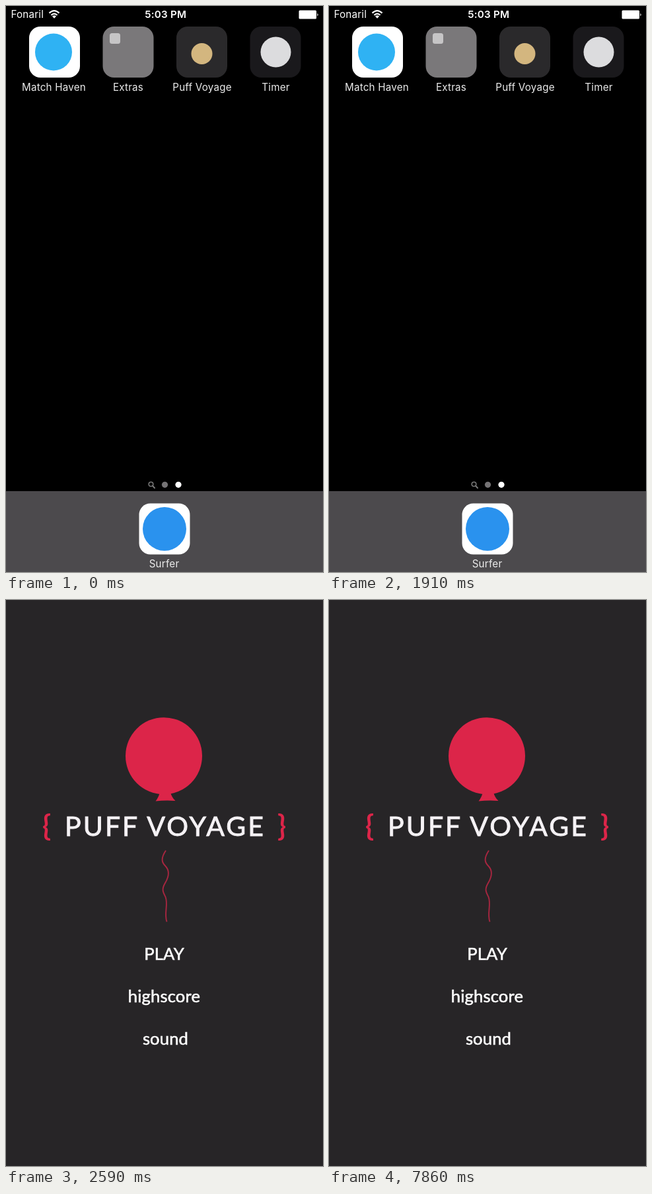
Animation of 480x854 px, one loop 8000 ms. Source, as an HTML page:

```html
<!DOCTYPE html>
<html lang="en">
<head>
<meta charset="utf-8">
<title>Puff Voyage launch</title>
<style>
  html, body { margin: 0; width: 100%; height: 100%; overflow: hidden; background: #000; }
  svg { display: block; width: 100vw; height: 100vh; }
  .ui { font-family: Inter, Roboto, sans-serif; font-size: 15.2px; letter-spacing: .2px; }
  .label { fill: #ebebeb; text-anchor: middle; }
  .app { font-family: Lato, "Open Sans", sans-serif; text-anchor: middle; }
  .title { font-size: 41px; letter-spacing: 3px; fill: #f5f2f5; stroke: #f5f2f5; stroke-width: .9; }
  .brace { font-size: 43px; font-weight: 700; fill: #dc2549; }
  .menu { font-size: 25.6px; letter-spacing: .15px; fill: #fff; stroke: #fff; stroke-width: .6; }
</style>
</head>
<body>
<svg viewBox="0 0 480 854" preserveAspectRatio="none">
  <defs>
    <clipPath id="cardClip"><rect id="clipRect"/></clipPath>
  </defs>
  <rect width="480" height="854" fill="#000"/>

  <g id="home" class="ui">
    <g id="folder">
      <rect x="146.5" y="31" width="77" height="77" rx="17" fill="#7a787a"/>
      <rect x="157" y="41" width="16" height="16" rx="3.5" fill="#c6c5c6"/>
    </g>
    <g id="icons">
      <rect x="35" y="31" width="77" height="77" rx="17" fill="#fff"/>
      <circle cx="72" cy="69.5" r="28" fill="#2fb2f3"/>
      <rect x="258" y="31" width="77" height="77" rx="17" fill="#2a292b"/>
      <circle cx="296.5" cy="72" r="16" fill="#d3b67f"/>
      <rect x="369.5" y="31" width="77" height="77" rx="17" fill="#1a191c"/>
      <circle cx="408.5" cy="69.5" r="23" fill="#dcdcde"/>
      <g class="label">
        <text x="72.5" y="128.3">Match Haven</text>
        <text x="185" y="128.3">Extras</text>
        <text x="297" y="128.3">Puff Voyage</text>
        <text x="408.5" y="128.3">Timer</text>
      </g>
      <circle cx="219.5" cy="721.5" r="3.3" fill="none" stroke="#777" stroke-width="1.6"/>
      <path d="M222 724l3 3.2" stroke="#777" stroke-width="2" stroke-linecap="round"/>
      <circle cx="240.5" cy="722.3" r="4.6" fill="#757375"/>
      <circle cx="261" cy="722.3" r="4.6" fill="#fff"/>
      <rect y="732" width="480" height="122" fill="#4c4a4d"/>
      <rect x="201.5" y="750.5" width="77" height="77" rx="17" fill="#fff"/>
      <circle cx="240" cy="789" r="33" fill="#2a92ee"/>
      <text class="label" x="239.5" y="847.3">Surfer</text>
    </g>
  </g>

  <g id="card" clip-path="url(#cardClip)">
    <g id="screen">
      <rect width="480" height="854" fill="#272527"/>
      <g class="app">
        <circle cx="239" cy="235.2" r="58" fill="#dc2549"/>
        <path d="M233 290Q231 298 226.5 303.5Q241 302 256.5 303Q251 298 249 290Z" fill="#dc2549"/>
        <path d="M242 378C234 390 236 396 241 401C248 408 247 417 241 427C235 437 238 441 241.5 448C246 460 239 472 243.5 485.5"
              fill="none" stroke="#a82640" stroke-width="1.9"/>
        <text class="brace" x="61.5" y="356">{</text>
        <text class="title" x="241" y="356">PUFF VOYAGE</text>
        <text class="brace" x="417.5" y="356">}</text>
        <g class="menu">
          <text x="239.5" y="542.8">PLAY</text>
          <text x="239.5" y="607">highscore</text>
          <text x="241.5" y="671.2">sound</text>
        </g>
        <rect id="strike" x="204" y="664" width="77" height="4.4" fill="#fff"/>
      </g>
    </g>
    <g id="ghost">
      <rect width="77" height="77" fill="#2a292b"/>
      <circle cx="38.5" cy="41" r="16" fill="#d3b67f"/>
    </g>
  </g>

  <g id="status" class="ui" fill="currentColor">
    <text x="7.5" y="18">Fonaril</text>
    <g fill="none" stroke="currentColor" stroke-width="2.2">
      <path d="M65.5 10.6Q73 3.6 80.5 10.6"/>
      <path d="M68.4 13.8Q73 9.4 77.6 13.8"/>
    </g>
    <path d="M73 18.8L70 15.6Q73 13 76 15.6Z"/>
    <text x="241.7" y="18" text-anchor="middle" font-weight="600">5:03 PM</text>
    <rect x="443.5" y="6.5" width="26.5" height="13" rx="1.5"/>
    <path d="M471.3 11Q474 13 471.3 15.5Z"/>
  </g>
</svg>
<script>
const LOOP = 8000, OPEN = 1967, SETTLED = 2480, MUTE = 3910, UNMUTE = 5640;
const ICON = { x: 258, y: 31, size: 77 };
const STIFF = 0.0174;   // spring rate per ms
const GHOST_FADE = 33;  // ms

const el = {};
for (const node of document.querySelectorAll("[id]")) el[node.id] = node;

const set = (node, attrs) => {
  for (const name in attrs) node.setAttribute(name, attrs[name]);
};
const show = (node, on) => { node.style.display = on ? "" : "none"; };

// Critically damped spring from 0 to 1
const spring = ms => ms <= 0 ? 0 : 1 - (1 + STIFF * ms) * Math.exp(-STIFF * ms);

function draw(t) {
  const since = t - OPEN;
  const p = t >= SETTLED ? 1 : spring(since);
  const rest = 1 - p;

  const x = ICON.x * rest, y = ICON.y * rest;
  const w = ICON.size + (480 - ICON.size) * p;
  const h = w * (1 + (854 / 480 - 1) * p);
  const zoom = w / ICON.size;
  const place = (sx, sy) => `translate(${x} ${y}) scale(${sx} ${sy})`;

  set(el.home, { transform: `${place(zoom, zoom)} translate(${-ICON.x} ${-ICON.y})` });
  set(el.icons, { opacity: rest });
  set(el.clipRect, { x, y, width: w, height: h, rx: 14 * rest });
  set(el.screen, { transform: place(w / 480, h / 854) });
  set(el.ghost, {
    transform: place(zoom, h / ICON.size),
    opacity: Math.exp(-Math.max(0, since) / GHOST_FADE)
  });

  const grey = Math.round(255 * rest);
  el.status.style.color = `rgb(${grey},${grey},${grey})`;
  set(el.status, { opacity: Math.min(1, rest * 9) });

  show(el.card, since > 0);
  show(el.ghost, t < SETTLED);
  show(el.home, p < 1);
  show(el.status, p < 1);
  show(el.strike, t >= MUTE && t < UNMUTE);
}

function tick() {
  draw(performance.now() % LOOP);
  requestAnimationFrame(tick);
}
tick();
</script>
</body>
</html>
```
